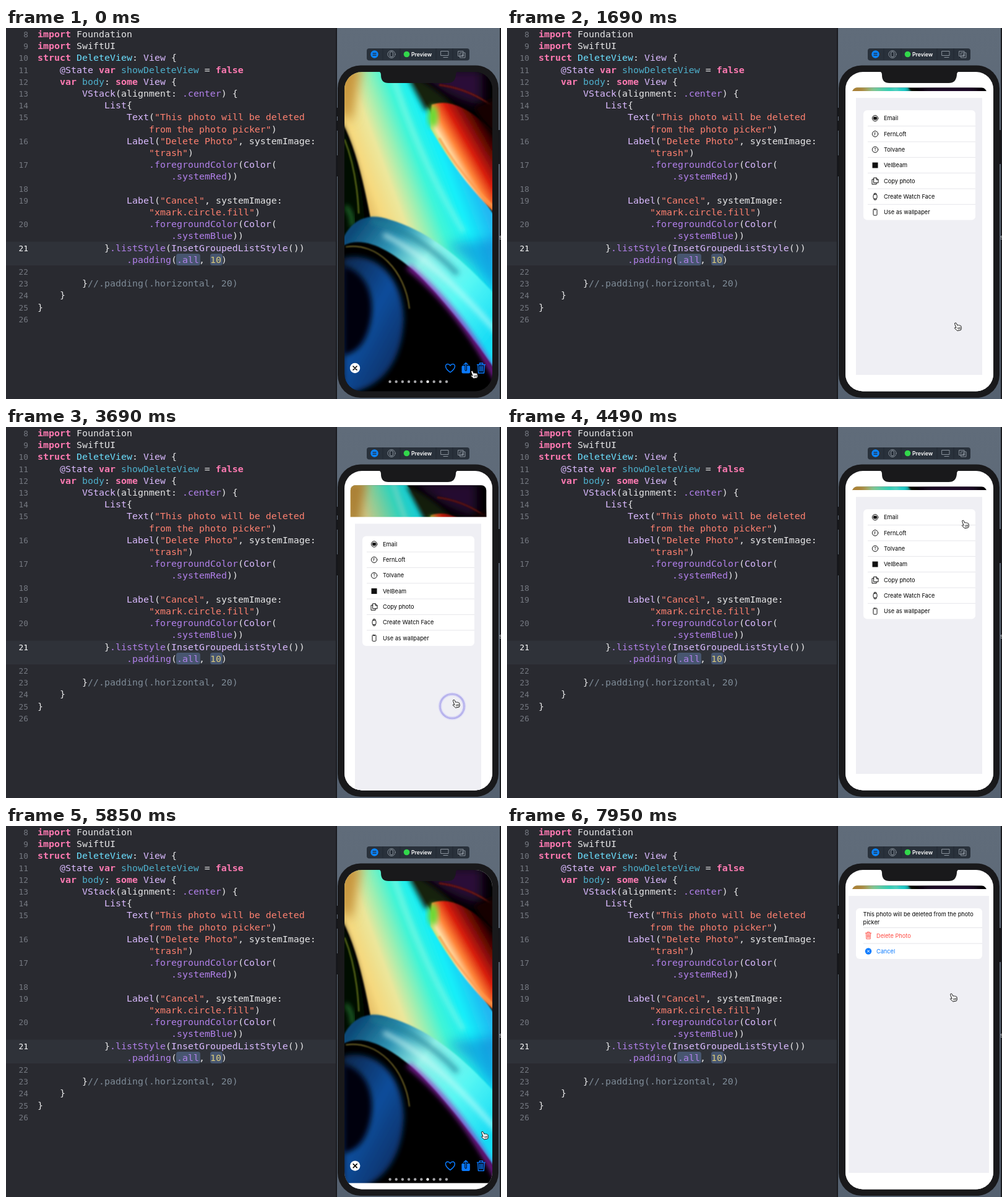
Write an HTML page that moves like this. It is 800x600 px and loops after 8000 ms.

```html
<!DOCTYPE html>
<html lang="en">
<head>
<meta charset="utf-8">
<style>
html, body { margin: 0; width: 100%; height: 100%; overflow: hidden; background: #292a30; }
svg { display: block; width: 800px; height: 600px; }
text { white-space: pre; }
#code { font: 14.95px "DejaVu Sans Mono", "Noto Sans Mono", monospace; }
#code .n { font-size: 12.8px; fill: #747880; text-anchor: end; }
#code .on { fill: #fff; }
.w { fill: #e6e6e7; } .k { fill: #ff7ab2; font-weight: 700; } .s { fill: #ff8170; }
.t { fill: #dabaff; } .p { fill: #b281eb; } .d { fill: #6bdfff; } .v { fill: #4eb0cc; }
.c { fill: #7f8c98; } .y { fill: #d9c97c; }
.ui { font: 9.2px Inter, "Liberation Sans", sans-serif; }
.line { fill: none; stroke-linecap: round; stroke-linejoin: round; }
</style>
</head>
<body>
<svg viewBox="0 0 800 600">
  <defs>
    <clipPath id="screen"><rect x="547" y="71" width="239" height="516.5" rx="28"/></clipPath>
    <clipPath id="card"><rect x="546" y="70.5" width="241" height="518" rx="9"/></clipPath>
    <filter id="soft1" x="-20%" y="-20%" width="140%" height="140%"><feGaussianBlur stdDeviation="1.2"/></filter>
    <filter id="soft4" x="-30%" y="-30%" width="160%" height="160%"><feGaussianBlur stdDeviation="4"/></filter>
    <filter id="soft9" x="-60%" y="-60%" width="220%" height="220%"><feGaussianBlur stdDeviation="9"/></filter>
    <linearGradient id="beam" gradientUnits="userSpaceOnUse" x1="555" y1="250" x2="735" y2="183">
      <stop offset="0" stop-color="#dcae55"/><stop offset=".16" stop-color="#f6d97e"/>
      <stop offset=".32" stop-color="#ece79c"/><stop offset=".46" stop-color="#98f0b4"/>
      <stop offset=".6" stop-color="#3ff5d8"/><stop offset=".8" stop-color="#14effa"/>
      <stop offset="1" stop-color="#22b8f2"/>
    </linearGradient>
    <linearGradient id="fire" gradientUnits="userSpaceOnUse" x1="694" y1="182" x2="768" y2="140">
      <stop offset="0" stop-color="#9fe860"/><stop offset=".12" stop-color="#ffe0a8"/>
      <stop offset=".28" stop-color="#ff8438"/><stop offset=".5" stop-color="#d81d0a"/>
      <stop offset=".78" stop-color="#6a0806"/><stop offset="1" stop-color="#180202"/>
    </linearGradient>
    <linearGradient id="ribbon" gradientUnits="userSpaceOnUse" x1="560" y1="330" x2="786" y2="500">
      <stop offset="0" stop-color="#0b4a78"/><stop offset=".22" stop-color="#2f94b4"/>
      <stop offset=".42" stop-color="#8ff0e8"/><stop offset=".7" stop-color="#58f8f4"/>
      <stop offset="1" stop-color="#16dcf6"/>
    </linearGradient>
    <linearGradient id="disc" x1="0" y1="0" x2=".8" y2="1">
      <stop offset="0" stop-color="#08264a"/><stop offset=".5" stop-color="#0c4d9c"/><stop offset="1" stop-color="#052a5c"/>
    </linearGradient>
    <linearGradient id="desk" x2="0" y2="1">
      <stop offset="0" stop-color="#606c7a"/><stop offset="1" stop-color="#556170"/>
    </linearGradient>
    <g id="trash" class="line">
      <path d="M-6.5-5.5H6.5M-2.5-5.5V-8H2.5V-5.5M-5.3-5.5-4.5 8H4.5L5.3-5.5M-2.3-3V5M0-3V5M2.3-3V5"/>
    </g>
  </defs>

  <rect width="800" height="600" fill="#292a30"/>
  <rect y="345.5" width="533" height="38.5" fill="#2f3239"/>
  <g fill="#475670"><rect x="275" y="365" width="39" height="19" rx="4"/><rect x="330" y="365" width="20" height="19" rx="4"/></g>
  <g id="code"></g>
  <rect id="caret" x="355" y="365" width="1.5" height="19" fill="#fff"/>

  <rect x="533" width="267" height="600" fill="#1b1c20"/>
  <rect x="535" width="263" height="600" fill="url(#desk)"/>
  <text x="797" y="342" class="ui" fill="#ddd">s</text>

  <rect x="583" y="33" width="166" height="19.5" rx="4" fill="#29313b"/>
  <path d="M609 33V52M637 33V52M695 33V52M722 33V52" stroke="#222932"/>
  <circle cx="595.5" cy="42.5" r="6.2" fill="#0a84ff"/>
  <path d="M592.5 41H598.5M592.5 44H598.5" stroke="#29313b" stroke-width="1.5"/>
  <g class="line" stroke="#8a939d">
    <circle cx="623" cy="42.5" r="6"/><rect x="620.5" y="38.5" width="5" height="8" rx="1.5"/>
    <path d="M703 37.5H715V44.5H703ZM707 47.5H714"/>
    <path d="M731 37.5H739V45.5H731ZM734 40H742V48H734ZM738 42V46M736 44H740" fill="#29313b"/>
  </g>
  <circle cx="647.5" cy="42.5" r="4.8" fill="#32d74b"/>
  <text x="655" y="45.7" class="ui" style="font-size:8.6px;font-weight:600" fill="#fff">Preview</text>

  <path d="M534 129h3v14h-3zM534 150h3v16h-3zM534 206h3v34h-3zM795 165h3v55h-3z" fill="#15161a"/>
  <rect x="536" y="60.5" width="260" height="537.5" rx="37" fill="#19191b"/>

  <g clip-path="url(#screen)">
    <rect id="backdrop" x="547" y="71" width="240" height="517" fill="#fff"/>
    <g id="photo">
      <g clip-path="url(#card)">
        <rect x="546" y="70" width="242" height="519"/>
        <path d="M660 66H770V125C730 118 700 100 660 66Z" fill="#2a0c38" filter="url(#soft9)"/>
        <path d="M700 92C730 96 765 108 795 134" fill="none" stroke="#6a1408" stroke-width="3" filter="url(#soft1)"/>
        <path d="M540 60H638C672 100 686 134 698 162S762 262 795 312V475C730 372 650 318 592 322 580 262 568 198 540 146Z" fill="url(#beam)" filter="url(#soft1)"/>
        <path d="M530 60H576L558 150 540 140Z" fill="#c8963c" filter="url(#soft9)"/>
        <path d="M620 60C646 150 690 250 740 330" fill="none" stroke="#c4ffe6" stroke-width="7" opacity=".45" filter="url(#soft4)"/>
        <path d="M710 350C745 370 770 400 795 440V340Z" fill="#0a62c8" opacity=".45" filter="url(#soft9)"/>
        <path d="M644 70C690 92 728 126 742 150 716 122 692 126 678 134Z" fill="#16230f" filter="url(#soft4)"/>
        <path d="M688 124C722 112 758 136 795 176V304C750 262 714 212 686 162Z" fill="url(#fire)" filter="url(#soft1)"/>
        <path d="M700 178C726 222 758 262 795 296" fill="none" stroke="#ff9a4a" stroke-width="4" opacity=".7" filter="url(#soft1)"/>
        <ellipse cx="690" cy="143" rx="8" ry="18" fill="#66dc30" filter="url(#soft4)"/>
        <path d="M756 128C768 148 782 166 800 176V110Z" fill="#140103" filter="url(#soft4)"/>
        <path d="M540 150C562 195 578 255 580 322L540 345Z" fill="#060905" filter="url(#soft4)"/>
        <path d="M547 180C561 215 568 255 570 300" fill="none" stroke="#6b7a1c" stroke-width="2" filter="url(#soft1)"/>
        <path d="M549 288C556 296 560 308 560 322" fill="none" stroke="#2a8b3a" stroke-width="5" filter="url(#soft4)"/>
        <path d="M545 372C590 360 640 395 643 470C640 550 600 585 545 592Z" fill="url(#disc)" filter="url(#soft4)"/>
        <path d="M545 385C585 395 598 440 588 480S560 525 545 530Z" fill="#02050d" filter="url(#soft4)"/>
        <path d="M545 340C562 304 592 300 620 310C690 330 745 382 795 436V560C755 500 702 430 654 388 622 362 580 334 545 352Z" fill="url(#ribbon)" filter="url(#soft1)"/>
        <path d="M590 312C640 322 690 356 730 398" fill="none" stroke="#1d7f96" stroke-width="8" opacity=".7" filter="url(#soft4)"/>
        <path d="M610 334C676 366 736 426 795 494" fill="none" stroke="#d4fffa" stroke-width="7" opacity=".65" filter="url(#soft4)"/>
        <path d="M650 386C706 432 755 494 795 572" fill="none" stroke="#9a22bc" stroke-width="7" filter="url(#soft4)"/>
        <path d="M549 354C600 346 645 392 652 454" fill="none" stroke="#b3a13e" stroke-width="1.2" filter="url(#soft1)"/>
        <rect id="dim" x="546" y="70" width="242" height="519"/>
      </g>
      <circle cx="564" cy="550" r="8.2" fill="#fff"/>
      <path d="M561 547 567 553M567 547 561 553" stroke="#000" stroke-width="1.6" class="line"/>
      <path class="line" transform="translate(718 550)" stroke="#0a7aff" stroke-width="1.5" d="M0 6.8C-10 0-8.5-6.5-4-6.5-1.5-6.5 0-4 0-4S1.5-6.5 4-6.5C8.5-6.5 10 0 0 6.8Z"/>
      <g id="shareButton">
        <rect x="736.5" y="546" width="13.5" height="12.5" rx="2" fill="#0a7aff"/>
        <path class="line" d="M743.2 553V542M740 544.5 743.2 541.5 746.5 544.5" stroke="#000" stroke-width="3.5"/>
        <path class="line" d="M743.2 553V542M740 544.5 743.2 541.5 746.5 544.5" stroke="#0a7aff" stroke-width="1.5"/>
      </g>
      <use id="trashButton" href="#trash" transform="translate(768 550)" stroke="#0a7aff" stroke-width="1.4"/>
      <g id="dots"></g>
    </g>
    <g id="sheet">
      <rect x="547" y="102" width="240" height="520" rx="7" fill="#fff"/>
      <g id="shareList"></g>
      <g id="deleteList">
        <rect x="552" y="113" width="227" height="448" fill="#efeff4"/>
        <rect x="564" y="133" width="204" height="82" rx="6" fill="#fff"/>
        <path d="M576 164.5H768M576 190H768" stroke="#e4e4e8"/>
        <g class="ui">
          <text x="575.5" y="146">This photo will be deleted from the photo</text>
          <text x="575.5" y="158.5">picker</text>
          <text x="597" y="180.5" fill="#ff4a42">Delete Photo</text>
          <text x="597" y="206" fill="#0a7aff">Cancel</text>
        </g>
        <use href="#trash" transform="translate(584 177) scale(.7)" stroke="#ff4a42" stroke-width="1.3"/>
        <circle cx="584" cy="202.5" r="5.2" fill="#0a7aff"/>
        <path d="M582 200.5 586 204.5M586 200.5 582 204.5" stroke="#fff"/>
      </g>
    </g>
  </g>
  <path d="M600 70H733C728 70 727 73 727 76 726 85 722 89 714 89H618C610 89 606 85 606 76 606 73 605 70 600 70Z" fill="#19191b"/>

  <g id="ring" fill="none">
    <circle stroke="#a9a0ff" stroke-width="6" opacity=".25"/>
    <circle stroke="#8c86e0" stroke-width="2.5"/>
    <circle stroke="#dcd8ff" stroke-width=".8"/>
  </g>
  <g id="hand" stroke="#111" stroke-linejoin="round" stroke-linecap="round">
    <path fill="#fff" d="M-5-5.2c.9-1 2-.6 2.4.3l1.5 3.3c.6-.9 1.8-.8 2.1 0 .7-.7 1.7-.4 2 .4.8-.5 1.7 0 1.9.9l.5 3.2c.1 1-.5 1.8-1 3l-5.6 1.1c-1.2-1.6-2.5-2.2-4-3.6-1-.9.1-2.1 1.3-1.4l1 .5-2.2-5.8c-.2-.7-.2-1.5.1-1.9z"/>
    <path fill="none" stroke-width=".8" d="M-.4 2 .2 4.5M1.5 1.6 2 4.2M3.2 1.3 3.6 3.8"/>
  </g>
</svg>
<script>
const $ = id => document.getElementById(id);
const DURATION = 8000, SHEET_TRAVEL = 485;

// Each row: line number, indent in columns, then ~-separated runs led by a style letter.
const code = [
  [8, 0, '~kimport~w Foundation'],
  [9, 0, '~kimport~w SwiftUI'],
  [10, 0, '~kstruct~d DeleteView~w: ~tView~w {'],
  [11, 4, '~t@State ~kvar~v showDeleteView~w = ~kfalse'],
  [12, 4, '~kvar~v body~w: ~ksome~t View~w {'],
  [13, 8, '~tVStack~w(alignment: ~p.center~w) {'],
  [14, 12, '~tList~w{'],
  [15, 16, '~tText~w(~s"This photo will be deleted'],
  ['', 20, '~sfrom the photo picker"~w)'],
  [16, 16, '~tLabel~w(~s"Delete Photo"~w, systemImage:'],
  ['', 20, '~s"trash"~w)'],
  [17, 20, '~p.foregroundColor~w(~tColor~w('],
  ['', 24, '~p.systemRed~w))'],
  [18, 0, ''],
  [19, 16, '~tLabel~w(~s"Cancel"~w, systemImage:'],
  ['', 20, '~s"xmark.circle.fill"~w)'],
  [20, 20, '~p.foregroundColor~w(~tColor~w('],
  ['', 24, '~p.systemBlue~w))'],
  [21, 12, '~w}~p.listStyle~w(~tInsetGroupedListStyle~w())'],
  ['', 16, '~p.padding~w(~p.all~w, ~y10~w)'],
  [22, 0, ''],
  [23, 8, '~w}~c//.padding(.horizontal, 20)'],
  [24, 4, '~w}'],
  [25, 0, '~w}'],
  [26, 0, '']
];
$('code').innerHTML = code.map(([number, indent, runs], i) => {
  const y = 15 + 19.2 * i;
  const spans = runs.split('~').slice(1).map(r => `<tspan class="${r[0]}">${r.slice(1)}</tspan>`).join('');
  return `<text class="n ${number === 21 ? 'on' : ''}" x="36" y="${y}">${number}</text>` +
    `<text x="${51 + 9 * indent}" y="${y}">${spans}</text>`;
}).join('');

$('dots').innerHTML = Array.from({ length: 10 }, (_, i) =>
  `<circle cx="${620.5 + 10.17 * i}" cy="572" r="2.2" fill="${i === 6 ? '#fff' : '#a3a3a6'}"/>`).join('');

const letterIcon = c => `<circle r="4.7"/><text y="2.3" text-anchor="middle" style="font-size:6.5px" stroke="none" fill="#111">${c}</text>`;
const rows = [
  ['Email', '<circle r="4.7"/><rect x="-2.7" y="-2" width="5.4" height="4" rx=".8" fill="#111"/>'],
  ['FernLoft', letterIcon('F')],
  ['Tolvane', letterIcon('T')],
  ['VelBeam', '<rect x="-4.5" y="-4.5" width="9" height="9" fill="#111" stroke="none"/>'],
  ['Copy photo', '<path d="M-2-5H2L5-2V3H-2ZM-2-2.5H-5V5.5H2V3M2-5V-2H5"/>'],
  ['Create Watch Face', '<rect x="-3" y="-3.5" width="6" height="7" rx="2"/><path d="M-2-3.5-1.5-5.3H1.5L2-3.5M-2 3.5-1.5 5.3H1.5L2 3.5"/>'],
  ['Use as wallpaper', '<rect x="-3" y="-5" width="6" height="10" rx="1.3"/><path d="M-1-4H1"/>']
];
$('shareList').innerHTML =
  '<rect x="564" y="113" width="204" height="448" fill="#efeff4"/>' +
  '<rect x="576" y="133" width="181" height="177.5" rx="6" fill="#fff"/>' +
  rows.map(([label, icon], i) => {
    const y = 146 + 25.33 * i;
    return (i ? `<path d="M583 ${y - 12.7}H757" stroke="#e6e6ea"/>` : '') +
      `<g class="ui"><g class="line" stroke="#111" transform="translate(595 ${y})">${icon}</g>` +
      `<text x="609" y="${y + 3.3}">${label}</text></g>`;
  }).join('');

const handPath = [
  [80, 757, 560], [240, 750, 558], [1450, 752, 559], [1690, 729, 483], [1950, 712, 390],
  [2200, 697, 342], [2440, 706, 300], [2790, 722, 367], [2970, 725, 407], [3310, 725, 352],
  [3650, 728, 460], [4170, 726, 296], [4490, 741, 157], [4800, 744, 112], [5050, 746, 151],
  [5370, 757, 364], [5480, 773, 425], [5850, 774, 500], [6590, 774, 500], [6900, 773, 556],
  [7250, 773, 556], [7470, 762, 490], [7700, 736, 350], [7950, 722, 277]
];
const presses = [[650, 800], [2440, 2790], [3310, 3650], [5050, 5480], [7100, 7230]];

const clamp = x => Math.max(0, Math.min(1, x));

function handAt(t) {
  const i = handPath.findIndex(k => k[0] > t);
  if (i < 1) return handPath.at(i).slice(1);
  const [t0, x0, y0] = handPath[i - 1], [t1, x1, y1] = handPath[i];
  const u = (t - t0) / (t1 - t0);
  return [x0 + (x1 - x0) * u, y0 + (y1 - y0) * u];
}

const dragged = (t, from) => Math.max(0, handAt(t)[1] - handAt(from)[1]);

// Distance of the sheet below its open position.
function sheetOffset(t) {
  const opening = start => SHEET_TRAVEL * Math.exp(-(t - start) / 115);
  if (t < 830) return SHEET_TRAVEL;
  if (t < 2440) return t > 1450 ? 0 : opening(830);
  if (t < 5050) {
    const [down, up] = t < 3310 ? presses[1] : presses[2];
    const offset = dragged(Math.min(t, up), down) * Math.exp(-Math.max(0, t - up) / 45);
    return offset < .7 ? 0 : offset;
  }
  if (t < 5480) return dragged(t, 5050);
  if (t < 6090) return SHEET_TRAVEL - (SHEET_TRAVEL - dragged(5480, 5050)) * Math.exp(-(t - 5480) / 120);
  if (t < 7230) return SHEET_TRAVEL;
  return t > 7850 ? 0 : opening(7230);
}

function drawRing(t) {
  const press = presses.find(([down, up]) => t >= down && t < up + 220);
  $('ring').style.display = press ? '' : 'none';
  if (!press) return;
  const [down, up] = press, [x, y] = handAt(Math.min(t, up));
  const radius = 26 - 6.5 * clamp((t - down) / 250);
  $('ring').setAttribute('transform', `translate(${x - 7} ${y - 8.5})`);
  $('ring').setAttribute('opacity', clamp((t - down + 30) / 60) * (1 - clamp((t - up) / 220)));
  for (const circle of $('ring').children) circle.setAttribute('r', radius);
}

function draw(t) {
  const offset = sheetOffset(t), open = 1 - offset / SHEET_TRAVEL;
  const scale = 1 - .098 * open;
  $('photo').setAttribute('transform', `translate(666.5 ${71 + 26 * open}) scale(${scale}) translate(-666.5 -71)`);
  $('dim').setAttribute('opacity', .16 * open);
  $('sheet').setAttribute('transform', `translate(0 ${offset})`);
  $('sheet').style.display = $('backdrop').style.display = open > 0 ? '' : 'none';
  $('shareList').style.display = t < 6500 ? '' : 'none';
  $('deleteList').style.display = t < 6500 ? 'none' : '';
  $('shareButton').setAttribute('opacity', t >= 650 && t < 800 ? .3 : 1);
  $('trashButton').setAttribute('opacity', t >= 7100 && t < 7230 ? .3 : 1);
  $('caret').setAttribute('opacity', t < 650 ? clamp((t - 80) / 160) : 0);
  $('hand').setAttribute('transform', `translate(${handAt(t).join(' ')})`);
  drawRing(t);
}

const start = performance.now();
function tick() {
  draw((performance.now() - start) % DURATION);
  requestAnimationFrame(tick);
}
tick();
</script>
</body>
</html>
```
